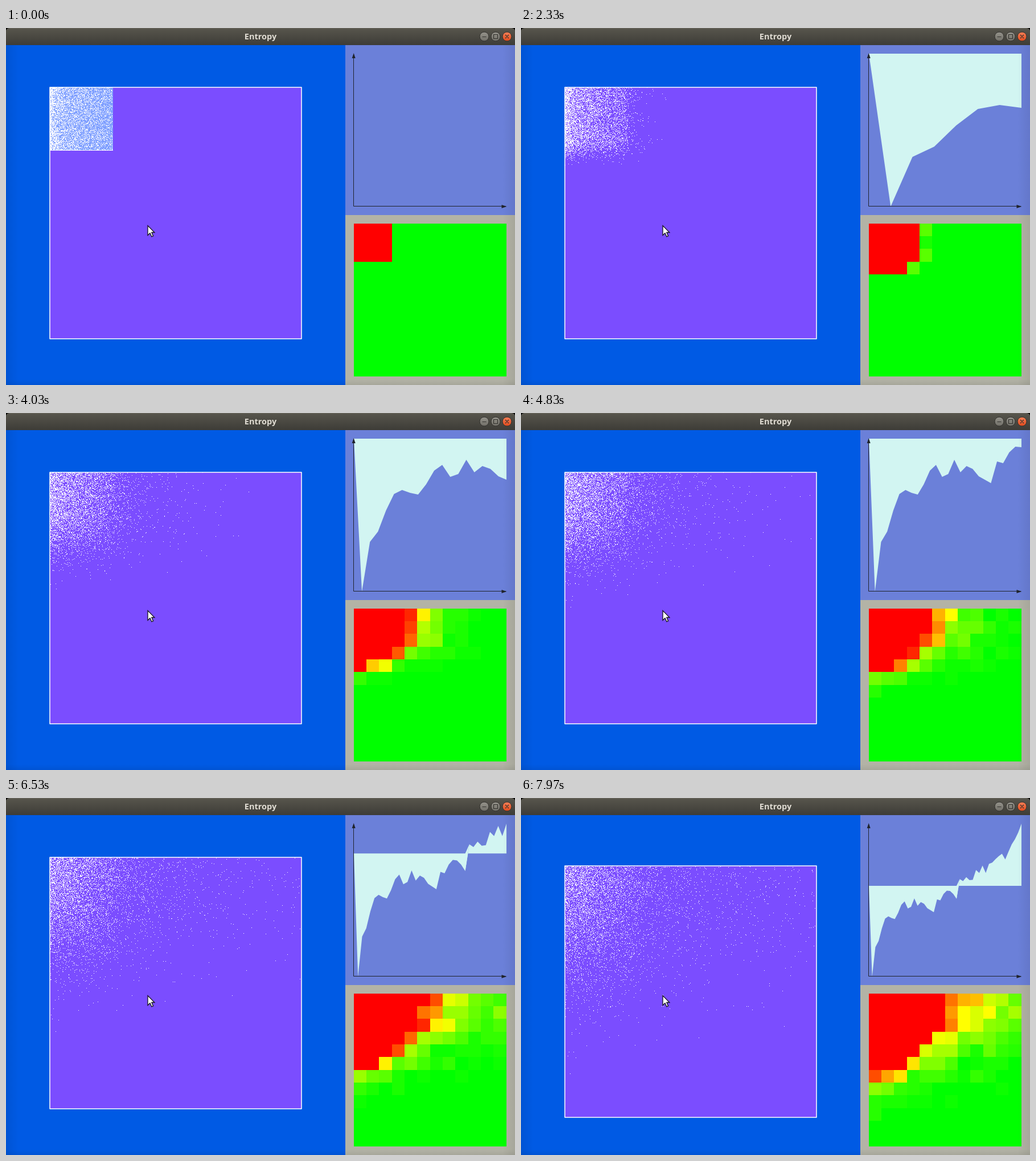
Animation of 894x626 px, one loop 8000 ms. Source, as an HTML page with a canvas:

```html
<!DOCTYPE html>
<html lang="en">
<head>
<meta charset="utf-8">
<title>Entropy</title>
<style>
  html, body { margin: 0; width: 100%; height: 100%; overflow: hidden; background: #000; }
  canvas, svg { position: absolute; left: 0; top: 0; display: block; }
  header {
    position: absolute; left: 0; top: 0; width: 894px; height: 30px; box-sizing: border-box;
    border-radius: 6px 6px 0 0; border-top: 1px solid #68665c;
    background: linear-gradient(#57554c, #3d3c37);
    color: #dfdbd2; text-align: center;
    font: 700 14.5px/28px "Open Sans", "Noto Sans", sans-serif;
  }
</style>
</head>
<body>
<canvas id="stage" width="894" height="626"></canvas>
<header>Entropy</header>
<svg width="894" height="626" viewBox="0 0 894 626">
  <defs>
    <linearGradient id="side">
      <stop offset="0" stop-opacity=".07"/>
      <stop offset="1" stop-opacity="0"/>
    </linearGradient>
    <linearGradient id="grey" x2="0" y2="1">
      <stop offset="0" stop-color="#95938b"/>
      <stop offset="1" stop-color="#706e67"/>
    </linearGradient>
    <linearGradient id="orange" x2="0" y2="1">
      <stop offset="0" stop-color="#f58058"/>
      <stop offset="1" stop-color="#e14a1c"/>
    </linearGradient>
  </defs>
  <rect y="30" width="22" height="596" fill="url(#side)"/>
  <rect width="22" height="596" fill="url(#side)" transform="translate(894 626) rotate(180)"/>
  <rect width="10" height="894" fill="url(#side)" transform="translate(0 626) rotate(-90)"/>
  <g stroke="#33322e">
    <circle cx="840" cy="15" r="8" fill="url(#grey)"/>
    <circle cx="860" cy="15" r="8" fill="url(#grey)"/>
    <circle cx="880" cy="15" r="8" fill="url(#orange)"/>
    <path d="M836.5 15.5h7M856.5 11.5h7v7h-7zM877 12l6 6M883 12l-6 6" fill="none" stroke-width="1.2"/>
  </g>
  <path d="M610.5 46V312.5H878" fill="none" stroke="#20242c"/>
  <path d="M610.7 44l3 9h-6zM879.5 313l-9 3v-6z" fill="#20242c"/>
  <path d="M249 346.5v17l4-3.8 2.8 6.2 2.8-1.2-2.8-6.2h5z" fill="#fff" stroke="#17151c" stroke-width="1.3"/>
</svg>
<script>
const LOOP = 8000, RELEASE = 1385, COUNT = 6000;
const SIZE = 441, CELLS = 12, FULL_CELL = 40;
const PLOT = { left: 611, top: 45, bottom: 313, size: 268 };
const ctx = document.getElementById('stage').getContext('2d');

// Entropy change per sample
const samples = [0, -268, -181, -163, -126, -97, -90, -95, -98, -80, -56, -46, -67, -62, -37, -59,
  -48, -53, -66, -72, -78, -40, -43, -24, -14, -15, -24, -38, 20, 14, 26, 17, 18, 47, 38, 60, 38,
  65, 69, 79, 88, 95, 78, 101, 123, 138, 158, 184];

let seed = 20177;
function random() {
  seed = (seed + 0x6D2B79F5) | 0;
  let r = Math.imul(seed ^ (seed >>> 15), seed | 1);
  r ^= r + Math.imul(r ^ (r >>> 7), r | 61);
  return ((r ^ (r >>> 14)) >>> 0) / 4294967296;
}

const laplace = scale => -Math.log(1 - random()) * scale * (random() < 0.5 ? -1 : 1);
const gauss = sigma =>
  sigma * Math.sqrt(-2 * Math.log(1 - random())) * Math.cos(2 * Math.PI * random());

// Speeds in pixels per second: a slow and a fast group sideways, a bell curve downwards
const particles = Array.from({ length: COUNT }, () => ({
  x: 110 * random() ** 1.7,
  y: 110 * random(),
  vx: laplace(random() < 0.35 ? 20 : 6),
  vy: gauss(11.5),
}));

const clamp = v => Math.min(1, Math.max(0, v));
const ease = (t, from, to) => (1 - Math.cos(Math.PI * clamp((t - from) / (to - from)))) / 2;

// Reflects a coordinate between the walls
function fold(p) {
  const m = ((p % (2 * SIZE)) + 2 * SIZE) % (2 * SIZE);
  return m < SIZE ? m : 2 * SIZE - m;
}

function boxOffset(t) {
  const nudge = 4 * Math.sin(Math.PI * clamp((t - 100) / 600)) ** 2;
  return Math.round(nudge + 43 * (ease(t, 7080, 7540) - ease(t, 7560, 8246)));
}

function fill(color, x, y, w, h) {
  ctx.fillStyle = color;
  ctx.fillRect(x, y, w, h);
}

function drawBox(t, counts) {
  const dy = boxOffset(t), age = Math.max(0, t - RELEASE) / 1000;
  fill('#7b4dff', 77, 104 + dy, 442, 441);
  if (t < 30) {
    fill('#80a0ff', 77, 104, 111, 110);
    fill('#fff', 77, 214, 111, 1);
  }
  ctx.fillStyle = '#fff';
  for (const p of particles) {
    const x = fold(p.x + p.vx * age), y = fold(p.y + p.vy * age);
    ctx.fillRect(77 + Math.floor(x), 104 + dy + Math.floor(y), 1, 1);
    const col = Math.min(CELLS - 1, Math.floor(x / SIZE * CELLS));
    const row = Math.min(CELLS - 1, Math.floor(y / SIZE * CELLS));
    counts[row * CELLS + col]++;
  }
  ctx.strokeStyle = '#fff';
  ctx.lineWidth = 1.5;
  ctx.lineJoin = 'round';
  ctx.strokeRect(77, 104 + dy, 442, 441);
}

function drawHeat(counts) {
  const edge = i => Math.round(i * PLOT.size / CELLS - 0.2);
  counts.forEach((count, i) => {
    const c = clamp(count / FULL_CELL), col = i % CELLS, row = Math.floor(i / CELLS);
    const color = `rgb(${Math.round(255 * clamp(2 * c))},${Math.round(255 * clamp(2 - 2 * c))},0)`;
    fill(color, 611 + edge(col), 343 + edge(row),
      edge(col + 1) - edge(col), edge(row + 1) - edge(row));
  });
}

function polygon(points) {
  ctx.beginPath();
  points.forEach(([x, y]) => ctx.lineTo(x, y));
  ctx.fill();
}

function drawChart(t) {
  const last = Math.min(samples.length - 1, Math.floor(13.92 + (t - 3270) / 140));
  if (last < 3) return;
  const shown = samples.slice(0, last + 1);
  const low = Math.min(...shown), high = Math.max(...shown);
  const yOf = v => PLOT.bottom - (v - low) / (high - low) * PLOT.size;
  const base = yOf(0);
  const points = shown.map((v, i) => [PLOT.left + i * PLOT.size / last, yOf(v)]);
  ctx.fillStyle = '#d2f5f2';
  polygon([[PLOT.left, base], ...points, [PLOT.left + PLOT.size, base]]);
  // Segments that cross the baseline are filled from its near end
  for (let i = 1; i <= last; i++) {
    if (shown[i - 1] * shown[i] < 0) polygon([[points[i - 1][0], base], points[i - 1], points[i]]);
  }
}

function draw(t) {
  fill('#005ae4', 0, 29, 596, 597);
  fill('#6b80d9', 596, 29, 298, 299);
  fill('#b3b3a6', 596, 328, 298, 298);
  const counts = new Array(CELLS * CELLS).fill(0);
  drawBox(t, counts);
  drawChart(t);
  drawHeat(counts);
}

const start = performance.now();
function tick() {
  draw((performance.now() - start) % LOOP);
  requestAnimationFrame(tick);
}
tick();
</script>
</body>
</html>
```
